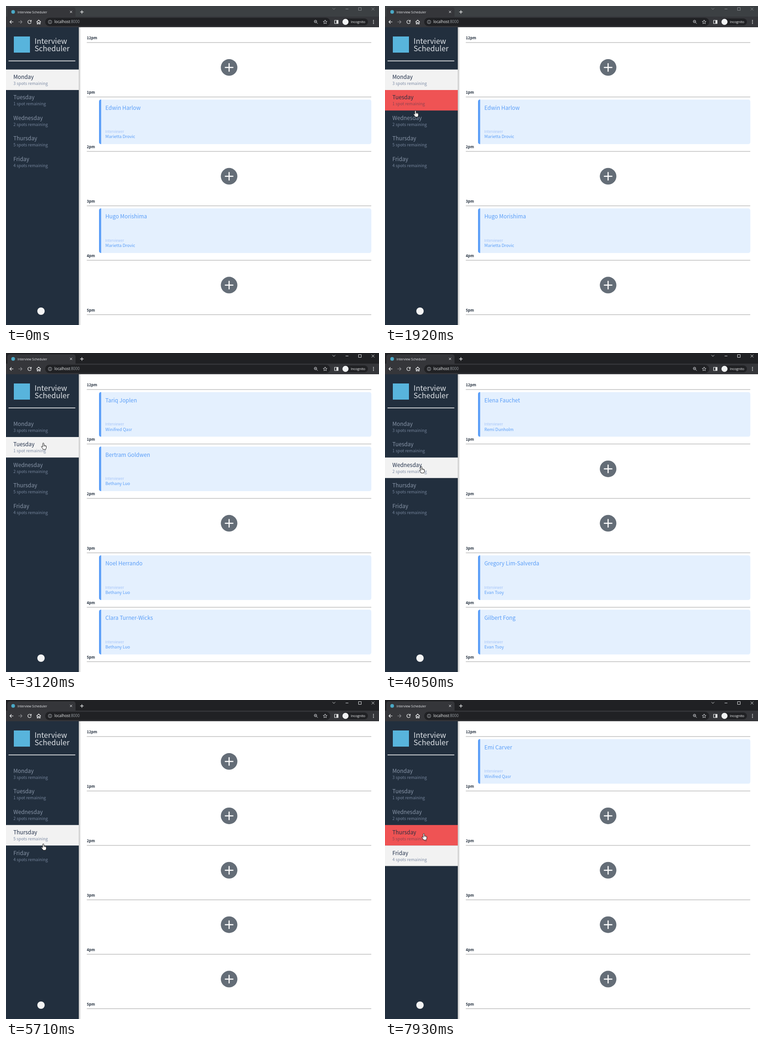
These frames come from a looping animation (810x691 px, 7990 ms). An HTML page with a canvas:

```html
<!DOCTYPE html>
<html lang="en">
<head>
<meta charset="utf-8">
<title>Interview Scheduler</title>
<style>
html, body { margin: 0; width: 100%; height: 100%; overflow: hidden; background: #fff; }
canvas { display: block; width: 810px; height: 691px; }
</style>
</head>
<body>
<canvas id="stage" width="810" height="691"></canvas>
<script>
const c = document.getElementById('stage').getContext('2d');
const LOOP = 7990;
const PAGE = '"Noto Sans CJK JP", "Noto Sans CJK SC", "Noto Sans CJK", "Open Sans", sans-serif';
const UI = '"Open Sans", "Noto Sans", sans-serif';
const ROW_Y = 137.6, ROW_H = 44.4, SIDE_W = 158;
const SLOT_Y = 79.2, SLOT_H = 117.88;

// Slots hold [student, interviewer] or null for a free spot.
const A = 'Marietta Drovic', B = 'Winifred Qasr', C = 'Bethany Luo', D = 'Remi Dunholm', E = 'Evan Tsoy';
const days = [
  { name: 'Monday', slots: [null, ['Edwin Harlow', A], null, ['Hugo Morishima', A], null] },
  { name: 'Tuesday', slots: [['Tariq Joplen', B], ['Bertram Goldwen', C], null, ['Noel Herrando', C], ['Clara Turner-Wicks', C]] },
  { name: 'Wednesday', slots: [['Elena Fauchet', D], null, null, ['Gregory Lim-Salverda', E], ['Gilbert Fong', E]] },
  { name: 'Thursday', slots: [null, null, null, null, null] },
  { name: 'Friday', slots: [['Emi Carver', B], null, null, null, null] }
];
const selectAt = [0, 3050, 4050, 4970, 6390];
const clicks = [[2970, 3050], [4850, 4970], [6310, 6390]];
const FOCUS_AT = 2970;

// Pointer moves; via is an optional curve control point.
const moves = [
  { t: [1040, 1780], steps: 12, from: [636, 676], via: [110, 640], to: [64, 276] },
  { t: [1840, 2180], steps: 6, from: [62, 276], to: [71, 166.5], pow: 0.72 },
  { t: [2570, 2830], steps: 5, from: [71, 166.5], to: [81, 195] },
  { t: [3510, 3910], steps: 7, from: [81, 195], to: [79, 246] },
  { t: [4310, 4710], steps: 7, from: [79, 246], to: [79, 290.5] },
  { t: [5450, 5990], steps: 9, from: [79, 290.5], to: [83, 333], pow: 1.2 },
  { t: [7450, 7710], steps: 5, from: [83, 333], to: [84, 294] },
  { t: [7850, 7930], steps: 2, from: [84, 294], to: [84.3, 289.3] }
];

const hand = new Path2D('M-1.3 8.6V1.3Q-1.3 0 0 0Q1.3 0 1.3 1.3V5Q2.6 4.4 3.1 5.4Q4.4 4.8 5 6Q6.4 5.6 6.5 7.2V10Q6.4 12 5.3 13V14H-.6V13Q-2.4 11 -4 8.6Q-4.6 7.3 -3.4 7Q-2.4 7 -1.3 8.6Z');
const knuckles = new Path2D('M1.3 5V7.6M3.1 5.4V7.6M5 6V8');
const arrow = new Path2D('M0 0V13L3 10.2L5 14.8L7 14L5.1 9.5H9.2Z');

function text(s, x, y, size, color, weight = 400, family = PAGE) {
  c.font = `${weight} ${size}px ${family}`;
  c.fillStyle = color;
  c.fillText(s, x, y);
}

function rect(x, y, w, h, color) {
  c.fillStyle = color;
  c.fillRect(x, y, w, h);
}

function round(x, y, w, h, r, color) {
  c.fillStyle = color;
  c.beginPath();
  c.roundRect(x, y, w, h, r);
  c.fill();
}

function disc(x, y, r, color) {
  c.fillStyle = color;
  c.beginPath();
  c.arc(x, y, r, 0, Math.PI * 2);
  c.fill();
}

function stroke(path, color, width = 1) {
  c.strokeStyle = color;
  c.lineWidth = width;
  c.stroke(new Path2D(path));
}

function pointerAt(t) {
  let m = null;
  for (const move of moves) if (t >= move.t[0]) m = move;
  if (!m) return null;
  const gap = (m.t[1] - m.t[0]) / (m.steps - 1);
  const step = Math.min(m.steps, Math.floor((t - m.t[0] + 12) / gap) + 1);
  const p = Math.pow(step / m.steps, m.pow || 1), q = 1 - p;
  const at = i => {
    const mid = m.via ? m.via[i] : (m.from[i] + m.to[i]) / 2;
    return q * q * m.from[i] + 2 * p * q * mid + p * p * m.to[i];
  };
  return { x: at(0), y: at(1) };
}

function rowAt(p) {
  if (!p || p.x >= SIDE_W) return -1;
  const i = Math.floor((p.y - ROW_Y) / ROW_H);
  return i >= 0 && i < days.length ? i : -1;
}

function drawBrowser(active) {
  const ink = active ? '#e8eaed' : '#8b8e92';
  const bar = '#35363a', dark = '#202124', white = '#f1f3f4';
  rect(0, 0, 810, 24, active ? dark : '#3c4043');
  round(3, 3, 148, 24, [5, 5, 0, 0], bar);
  rect(0, 23, 810, 23, bar);
  disc(15.5, 12.8, 4, '#4aa9c6');
  text('Interview Scheduler', 25, 15.5, 7, '#e8eaed', 400, UI);
  stroke('M139 10.5L143.5 15M143.5 10.5L139 15', white);
  stroke('M161 12.9H168.5M164.8 9.2V16.7', white, 1.2);
  stroke('M709 4.5L712 7.5L715 4.5M737.5 6.5H743.5M765.5 3.5H771.5V9.5H765.5ZM794 3.5L800 9.5M800 3.5L794 9.5', ink, 0.9);

  stroke('M16 34.5H8.5M12 31L8.5 34.5L12 38', white, 1.2);
  stroke('M27 34.5H34.8M31.3 31L34.8 34.5L31.3 38', '#85878a', 1.2);
  stroke('M54 32.1A3.7 3.7 0 1 0 54.7 35.4M54.8 30.3V33.3H51.8', white, 1.2);
  stroke('M66.4 34.8L71 30.4L75.6 34.8M67.8 34V38.8H69.8V35.8H72.2V38.8H74.2V34', white, 1.2);

  round(85, 25.5, 619, 18, 9, dark);
  stroke('M91.8 34.5a3.8 3.8 0 1 0 7.6 0a3.8 3.8 0 1 0 -7.6 0M95.6 33.7V36.7M95.6 31.9V32.9', '#bdc1c6', 0.9);
  text('localhost', 105, 37.4, 8.15, '#f1f3f4', 400, UI);
  const w = c.measureText('localhost').width;
  text(':8000', 105 + w, 37.4, 8.15, '#9aa0a6', 400, UI);
  stroke('M669.4 33.5a2.7 2.7 0 1 0 5.4 0a2.7 2.7 0 1 0 -5.4 0M674 35.4L677 38.4M670.8 33.5H673.4', '#dadce0');
  stroke('M693 30.3L694.2 33.1L697.2 33.4L694.9 35.4L695.6 38.4L693 36.8L690.4 38.4L691.1 35.4L688.8 33.4L691.8 33.1Z', '#dadce0', 0.9);
  stroke('M713.5 31H721.2V38H713.5Z', white, 1.1);
  rect(717.6, 31, 3.6, 7, white);
  round(730, 27, 56, 15, 7.5, dark);
  disc(737.2, 34.4, 6.6, white);
  text('Incognito', 749, 37.1, 7.15, '#f1f3f4', 400, UI);
  for (const y of [31.2, 34.5, 37.8]) disc(798, y, 0.95, white);
}

function drawSlots(slots) {
  ['12pm', '1pm', '2pm', '3pm', '4pm', '5pm'].forEach((hour, i) => {
    const y = SLOT_Y + i * SLOT_H;
    text(hour, 175.6, y - 6.9, 8, '#1f2b3a', 700);
    rect(175.5, y - 0.6, 617.7, 1.2, '#b2b2b2');
    if (i === slots.length) return;
    const slot = slots[i];
    if (slot) {
      c.save();
      c.beginPath();
      c.roundRect(202, y + 5.3, 591.3, 97, 4.5);
      c.clip();
      rect(202, y + 5.3, 592, 97, '#e4f0fe');
      rect(202, y + 5.3, 4.6, 97, '#5a9ef8');
      c.restore();
      text(slot[0], 215.7, y + 27.6, 11.85, '#5a9ef8');
      text('Interviewer', 215.6, y + 78, 7.6, '#a3c3f8', 300);
      text(slot[1], 215.7, y + 89.4, 9.2, '#5a9ef8');
    } else {
      disc(484.5, y + 53.9, 18, '#646d77');
      rect(475.3, y + 52.7, 18.4, 2.4, '#fff');
      rect(483.3, y + 44.7, 2.4, 18.4, '#fff');
    }
  });
}

function drawSidebar(selected, hover) {
  const shade = c.createLinearGradient(SIDE_W, 0, SIDE_W + 5, 0);
  shade.addColorStop(0, 'rgba(0,0,0,.24)');
  shade.addColorStop(1, 'rgba(0,0,0,0)');
  rect(SIDE_W, 46, 5, 645, shade);
  rect(0, 46, SIDE_W, 645, '#222f3e');
  rect(17, 66, 35, 35, '#58b4dc');
  text('Interview', 62, 81.8, 16.1, '#dfe3e8', 300);
  text('Scheduler', 62, 97.7, 16.1, '#dfe3e8', 300);
  rect(5.5, 118.2, 145, 1.5, '#f5f6f7');
  disc(76, 661, 8, '#f4f4f4');

  days.forEach((day, i) => {
    const y = ROW_Y + i * ROW_H;
    const free = day.slots.filter(s => !s).length;
    let ink = '#8895a8', faint = '#74839a';
    if (i === selected) {
      rect(0, y, SIDE_W, ROW_H, '#f2f2f2');
      ink = '#22304a';
      faint = '#7f8da6';
    } else if (i === hover) {
      rect(0, y, SIDE_W, ROW_H, '#ef5354');
      ink = '#2b2f40';
      faint = '#8f4450';
    }
    text(day.name, 16, y + 20.3, 11.85, ink);
    text(`${free} ${free === 1 ? 'spot' : 'spots'} remaining`, 16, y + 33.3, 9.05, faint, 300);
  });
}

function drawPointer(p, overRow) {
  c.save();
  c.translate(p.x, p.y);
  c.fillStyle = '#fff';
  c.strokeStyle = '#111';
  c.lineWidth = 0.9;
  c.lineJoin = 'round';
  c.fill(overRow ? hand : arrow);
  c.stroke(overRow ? hand : arrow);
  c.lineWidth = 0.6;
  if (overRow) c.stroke(knuckles);
  c.restore();
}

function draw(t) {
  const pointer = pointerAt(t);
  const hover = rowAt(pointer);
  const selected = selectAt.filter(s => t >= s).length - 1;
  rect(0, 0, 810, 691, '#fff');
  drawSlots(days[selected].slots);
  drawSidebar(selected, hover);
  drawBrowser(t >= FOCUS_AT);
  if (!pointer) return;
  if (clicks.some(([a, b]) => t >= a && t < b)) disc(pointer.x, pointer.y + 0.8, 7.4, '#f5a020');
  drawPointer(pointer, hover >= 0);
}

const start = performance.now();
function tick() {
  draw((performance.now() - start) % LOOP);
  requestAnimationFrame(tick);
}
tick();
</script>
</body>
</html>
```
